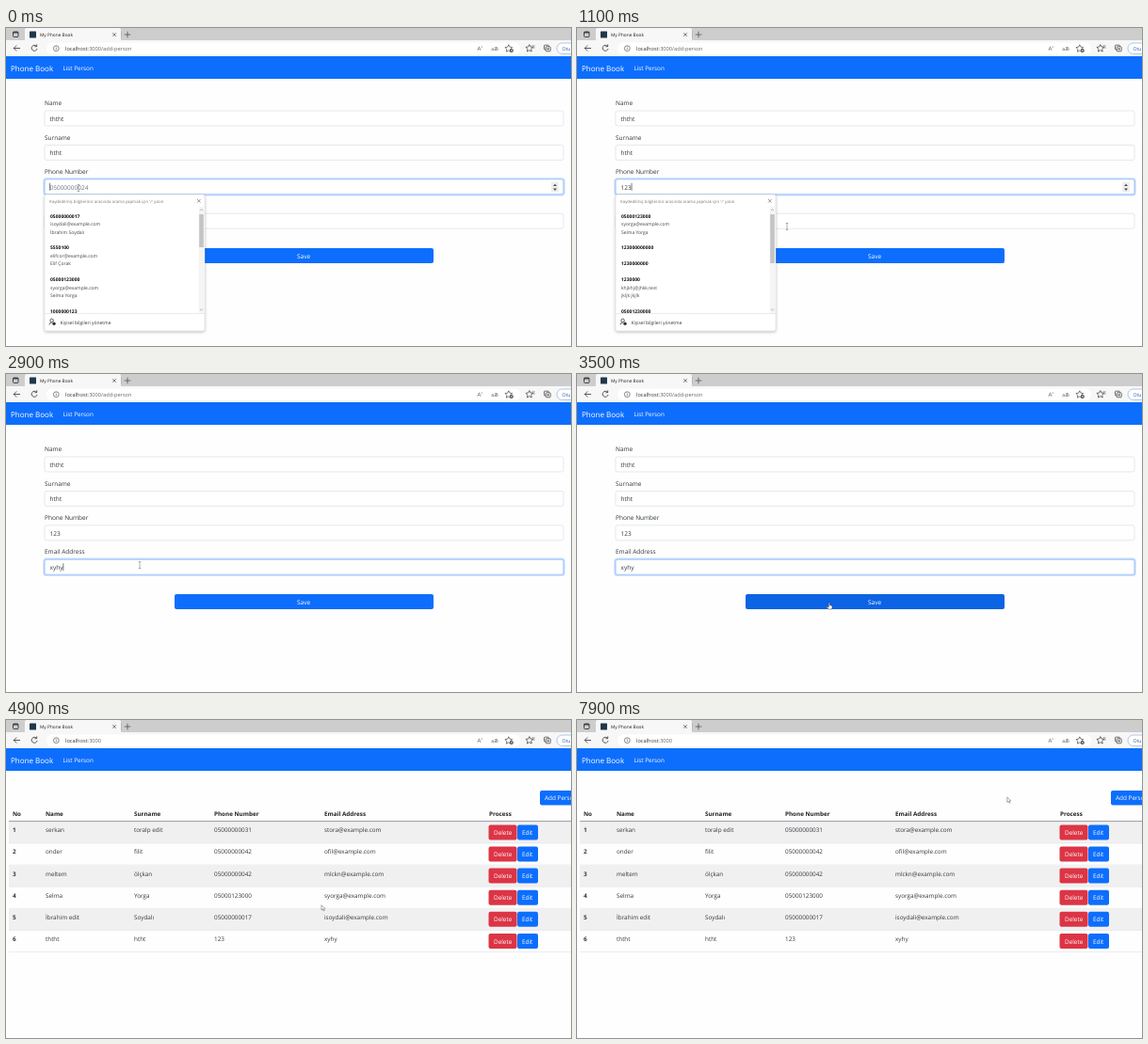
These frames come from a looping animation (600x338 px, 8 s). An HTML page:

```html
<!DOCTYPE html>
<html lang="tr">
<head>
<meta charset="utf-8">
<title>My Phone Book</title>
<style>
  html, body { margin: 0; width: 100%; height: 100%; overflow: hidden; background: #fefefe; }
  svg { display: block; width: 600px; height: 338px; }
  text { font-family: "Open Sans", "Noto Sans", "Noto Sans CJK JP", sans-serif; text-rendering: geometricPrecision; white-space: pre; }
</style>
</head>
<body>
<svg id="stage" viewBox="0 0 600 338"></svg>
<script>
const BLUE = '#0d6efd', INK = '#33373b', GREY = '#6c757d', LOOP = 8000;
const LIST_AT = 4450, PRESS_AT = 4150, EMAIL_AT = 1500, HOVER_AT = 3400;

const text = (s, x, y, size = 6.5, fill = INK, extra = '') =>
  `<text x="${x}" y="${y}" font-size="${size}" fill="${fill}" ${extra}>${s}</text>`;
const rect = (x, y, w, h, fill, r = 0, extra = '') =>
  `<rect x="${x}" y="${y}" width="${w}" height="${h}" rx="${r}" fill="${fill}" ${extra}/>`;
const line = (d, stroke = '#444', width = .8, extra = '') =>
  `<path d="${d}" fill="none" stroke="${stroke}" stroke-width="${width}" ${extra}/>`;
const group = (id, body, extra = '') => `<g id="${id}" ${extra}>${body}</g>`;
const BOLD = 'font-weight="700"';

function browser() {
  const star = 'l1.2 2.4 2.7 .4 -2 1.9 .5 2.7 -2.4 -1.3 -2.4 1.3 .5 -2.7 -2 -1.9 2.7 -.4z';
  return rect(0, 0, 600, 14, '#cdcdcd') +
    rect(0, 13, 600, 17, '#f7f7f7') + rect(20, 0, 102, 15, '#f7f7f7', 2) +
    rect(7.5, 4, 5.5, 5.5, 'none', 1, 'stroke="#333" stroke-width=".9"') + line('M7.5 4.8H13', '#333', 1.3) +
    rect(25, 3.5, 7, 7, '#20384a', .5) +
    text('My Phone Book', 36, 8.8, 4.8, '#222') +
    line('M113.3 5.2l3.6 3.6m0-3.6l-3.6 3.6', '#444', .7) +
    line('M122.5 3v8', '#aaa', .6) + line('M125.7 7h6.6m-3.3-3.3v6.6', '#444', .7) +
    line('M15 21.5H8.2m3-3l-3 3 3 3', '#333') +
    line('M32.5 19.4a3 3 0 1 0 .6 2.6m-.4-4.6v2.3h-2.3', '#333') +
    rect(43, 15.5, 503, 12.5, '#fff', 6) +
    `<circle cx="53.3" cy="21.7" r="2.9" fill="none" stroke="#555" stroke-width=".7"/>` +
    line('M53.3 21.2v2m0-3.4v.7', '#555', .7) +
    `<text x="63" y="23.8" font-size="5.65" fill="#333">localhost<tspan fill="#666" id="path"></tspan></text>` +
    text('A', 500.5, 24, 6, '#555') + text('»', 504.5, 21, 3.5, '#555') +
    text('aあ', 515.3, 23.8, 5, '#444') +
    line('M533.8 17.8' + star, '#444', .7) +
    `<circle cx="536.8" cy="24" r="2" fill="#444"/>` + line('M535.6 24h2.4m-1.2-1.2v2.4', '#fff', .5) +
    line('M555.8 17.6' + star, '#333', .7) + line('M558.5 19h3m-2 2h2', '#333', .6) +
    rect(571.5, 18.2, 4.8, 4.8, 'none', .8, 'stroke="#333" stroke-width=".7"') +
    rect(573.2, 19.8, 5, 5, '#f7f7f7', .8, 'stroke="#333" stroke-width=".7"') +
    line('M575.7 20.9v2.8m-1.4-1.4h2.8', '#333', .6) +
    rect(585, 16, 30, 11.5, '#fff', 5.7, 'stroke="#8fb3e0" stroke-width=".7"') +
    text('Otu', 590.5, 23.7, 5.2, '#2b5fa8') +
    rect(0, 30, 600, 24, BLUE) +
    text('Phone Book', 5, 45.8, 8, '#fff') + text('List Person', 60.5, 45, 6.3, '#fff');
}

const fieldTop = i => 88 + i * 36.4;

function form() {
  const labels = ['Name', 'Surname', 'Phone Number', 'Email Address'];
  const fields = labels.map((label, i) => {
    const y = fieldTop(i);
    return text(label, 41, y - 5.8) +
      rect(41, y, 551, 16, '#fff', 2, 'stroke="#d3d8de" stroke-width=".6"') +
      `<text id="value${i}" x="46.5" y="${y + 10.9}" font-size="6.5"></text>`;
  }).join('');
  return fields +
    group('ring', rect(40.2, -.8, 552.6, 17.6, 'none', 2.8, 'stroke="#c2dbfe" stroke-width="1.7"') +
      rect(41, 0, 551, 16, 'none', 2, 'stroke="#86b7fe" stroke-width=".6"')) +
    group('spinner', rect(579, 163.5, 8, 11, '#efefef') +
      '<path d="M581 168l2-2.3 2 2.3zM581 170.6l2 2.3 2-2.3z" fill="#505050"/>') +
    line('M0 0v8', '#222', .6, 'id="caret"') +
    rect(179, 234, 275, 16, BLUE, 2, 'id="save"') +
    text('Save', 316, 244.5, 6.5, '#fff', 'text-anchor="middle"');
}

function popup(id, dy, thumb, items) {
  let y = 201.6;
  const entries = items.map(lines => {
    const out = lines.map((s, i) => text(s, 47, y + i * 8.5, 5, i ? '#444' : '#111', i ? '' : BOLD)).join('');
    y += 8.3 + lines.length * 8.5;
    return out;
  }).join('');
  return group(id,
    rect(41, 177, 170, 145, '#fff', 2, 'filter="url(#shadow)" stroke="#ccc" stroke-width=".4"') +
    text("Kaydedilmiş bilgileriniz arasında arama yapmak için '/' yazın", 46, 185.8, 4.4, '#777') +
    line('M203 182l3.6 3.6m0-3.6l-3.6 3.6', '#555', .6) +
    `<g clip-path="url(#entries)">${entries}</g>` +
    rect(204.7, 190, 5.6, 113, '#f5f5f5') + rect(205.2, 198, 4.6, thumb, '#c4c4c4') +
    line('M205.9 194.2l1.6-1.6 1.6 1.6M205.9 298.6l1.6 1.6 1.6-1.6', '#888', .6) +
    line('M41 303.5H211', '#ddd', .6) +
    `<circle cx="48.6" cy="310.8" r="1.7" fill="none" stroke="#333" stroke-width=".8"/>` +
    line('M46 315.4q0-2.3 2.6-2.3', '#333') + `<circle cx="51" cy="314.3" r="1.7" fill="#333"/>` +
    text('Kişisel bilgileri yönetme', 57.5, 314.8, 4.95, '#333'),
    `transform="translate(0 ${dy})"`);
}

function list() {
  const cols = [7, 42, 136, 221, 338, 513];
  const people = [
    ['serkan', 'toralp edit', '05000000031', 'stora@example.com'],
    ['onder', 'filit', '05000000042', 'ofil@example.com'],
    ['meltem', 'ölçkan', '05000000042', 'mlckn@example.com'],
    ['Selma', 'Yorga', '05000123000', 'syorga@example.com'],
    ['İbrahim edit', 'Soydalı', '05000000017', 'isoydali@example.com'],
    ['ththt', 'htht', '123', 'xyhy']];
  const head = ['No', 'Name', 'Surname', 'Phone Number', 'Email Address', 'Process']
    .map((s, i) => text(s, cols[i], 101.8, 6.3, '#212529', BOLD)).join('');
  const rows = people.map((p, i) => {
    const y = 108 + i * 23.1;
    return (i % 2 ? '' : rect(3, y, 597, 23.1, '#f1f0f1')) + line(`M3 ${y + 23}H600`, '#dee2e6', .6) +
      [i + 1, ...p].map((s, c) => text(s, cols[c], y + 11.3, 6.35, INK, c ? '' : BOLD)).join('') +
      rect(512.5, y + 3.4, 30, 16, '#dc3545', 2) + text('Delete', 518, y + 14, 6.4, '#fff') +
      rect(543, y + 3.4, 22, 16, BLUE, 2) + text('Edit', 548, y + 14, 6.4, '#fff');
  }).join('');
  return rect(567, 75, 50, 15.5, BLUE, 2) + text('Add Person', 572, 85.2, 6.4, '#fff') +
    head + rows + line('M3 107.6H600', '#8d9093', .9);
}

const cursors =
  group('beam', line('M-1.3-3.5h2.6M0-3.5v7M-1.3 3.5h2.6', '#777', .6)) +
  group('hand', '<path d="M-.7-3.2q.7-.8 1.2 0v2.4l2 .5q.8.3.6 1.2l-.5 2.6h-3.7l-1.7-2.4q.3-1 1.3-.2l.8.6z" fill="#fff" stroke="#333" stroke-width=".5"/>') +
  group('arrow', '<path d="M0 0v5.4l1.3-1.1 1 2 .9-.4-.9-2h1.6z" fill="#fff" stroke="#555" stroke-width=".5"/>');

const $ = id => document.getElementById(id);
$('stage').innerHTML =
  `<defs><clipPath id="entries"><rect x="42" y="192" width="162" height="111"/></clipPath>
  <filter id="shadow" x="-10%" y="-10%" width="120%" height="120%"><feDropShadow dx="0" dy="1" stdDeviation="1.8" flood-opacity=".3"/></filter></defs>` +
  rect(0, 0, 600, 338, '#fefefe') + browser() + group('form', form()) + group('list', list()) +
  popup('recent', 0, 35, [
    ['05000000017', 'isoydali@example.com', 'İbrahim Soydalı'],
    ['5550100', 'elifcor@example.com', 'Elif Çorak'],
    ['05000123000', 'syorga@example.com', 'Selma Yorga'],
    ['1000000123']]) +
  popup('matches', 0, 52, [
    ['05000123000', 'syorga@example.com', 'Selma Yorga'],
    ['123000000000'], ['1230000000'],
    ['1230000', 'khjkhj@jhkk.test', 'jkljk jkjlk'],
    ['05001230000']]) +
  popup('emails', -124.5, 41, [
    ['kalkl@jjnet', 'jlglgj jghjj'],
    ['jkl@net', 'jljghj hjgghgh'],
    ['isoydali@example.com', '05000000017', 'İbrahim Soydalı'],
    ['elifcor@example.com', '5550100', 'Elif Çorak']]) +
  group('pointer', cursors);

const phoneKeys = [350, 600, 850], emailKeys = [2400, 2600, 2800, 2900];
const route = [[0, 77, 170], [300, 77, 170], [950, 223, 211], [1150, 223, 211], [1500, 160, 206],
  [2000, 142, 203], [2900, 142, 203], [3450, 268, 246.5], [3800, 268, 246.5], [4250, 281.5, 248],
  [4550, 281.5, 248], [5450, 440, 96], [6000, 458.3, 75], [6400, 458.3, 75], [7100, 456.8, 82], [LOOP, 456.8, 82]];

const show = (id, on) => $(id).style.display = on ? '' : 'none';
const typed = (s, keys, t) => s.slice(0, keys.filter(k => k <= t).length);

function setValue(i, value, hint) {
  $('value' + i).textContent = value || hint;
  $('value' + i).setAttribute('fill', value ? INK : GREY);
}

function at(t) {
  const i = Math.max(1, route.findIndex(p => p[0] > t));
  const [a, b] = [route[i - 1], route[i]];
  const u = (t - a[0]) / (b[0] - a[0]), e = u * u * (3 - 2 * u);
  return [a[1] + (b[1] - a[1]) * e, a[2] + (b[2] - a[2]) * e];
}

function draw(t) {
  const onList = t >= LIST_AT, onEmail = t >= EMAIL_AT, pressed = t >= PRESS_AT;
  show('form', !onList);
  show('list', onList);
  $('path').textContent = onList ? ':3000' : ':3000/add-person';

  const phone = typed('123', phoneKeys, t), email = typed('xyhy', emailKeys, t);
  setValue(0, 'ththt');
  setValue(1, 'htht');
  setValue(2, phone, '05000000024');
  setValue(3, email, 'ilkerfilit@example.com');
  // The email hint stays hidden behind nothing until that field is reached.
  if (!onEmail) $('value3').textContent = '';

  show('recent', !phone);
  show('matches', phone && !onEmail);
  show('emails', onEmail && !email);
  show('spinner', !onEmail);

  const field = onEmail ? 3 : 2;
  show('ring', !pressed);
  $('ring').setAttribute('transform', `translate(0 ${fieldTop(field)})`);
  const lastKey = Math.max(...[0, EMAIL_AT, ...phoneKeys, ...emailKeys].filter(k => k <= t));
  show('caret', !pressed && (t - lastKey) % 1000 < 500);
  const width = $('value' + field).getComputedTextLength();
  $('caret').setAttribute('transform', `translate(${46.6 + ((onEmail ? email : phone) ? width + .3 : 0)} ${fieldTop(field) + 4})`);

  const hover = Math.min(1, Math.max(0, (t - HOVER_AT) / 150));
  const shade = [[13, 11], [110, 94], [253, 215]].map(([a, b]) => a + (b - a) * hover);
  const save = $('save');
  save.setAttribute('fill', pressed ? '#0a58ca' : `rgb(${shade.map(Math.round)})`);
  save.setAttribute('stroke', pressed ? '#9fc3fa' : 'none');
  save.setAttribute('stroke-width', 1.6);

  const [x, y] = at(t), hand = t >= HOVER_AT && !onList, beam = t < 3050;
  $('pointer').setAttribute('transform', `translate(${x} ${y})`);
  show('beam', beam);
  show('hand', hand);
  show('arrow', !beam && !hand);
}

const start = performance.now();
function tick() {
  draw((performance.now() - start) % LOOP);
  requestAnimationFrame(tick);
}
tick();
</script>
</body>
</html>
```
